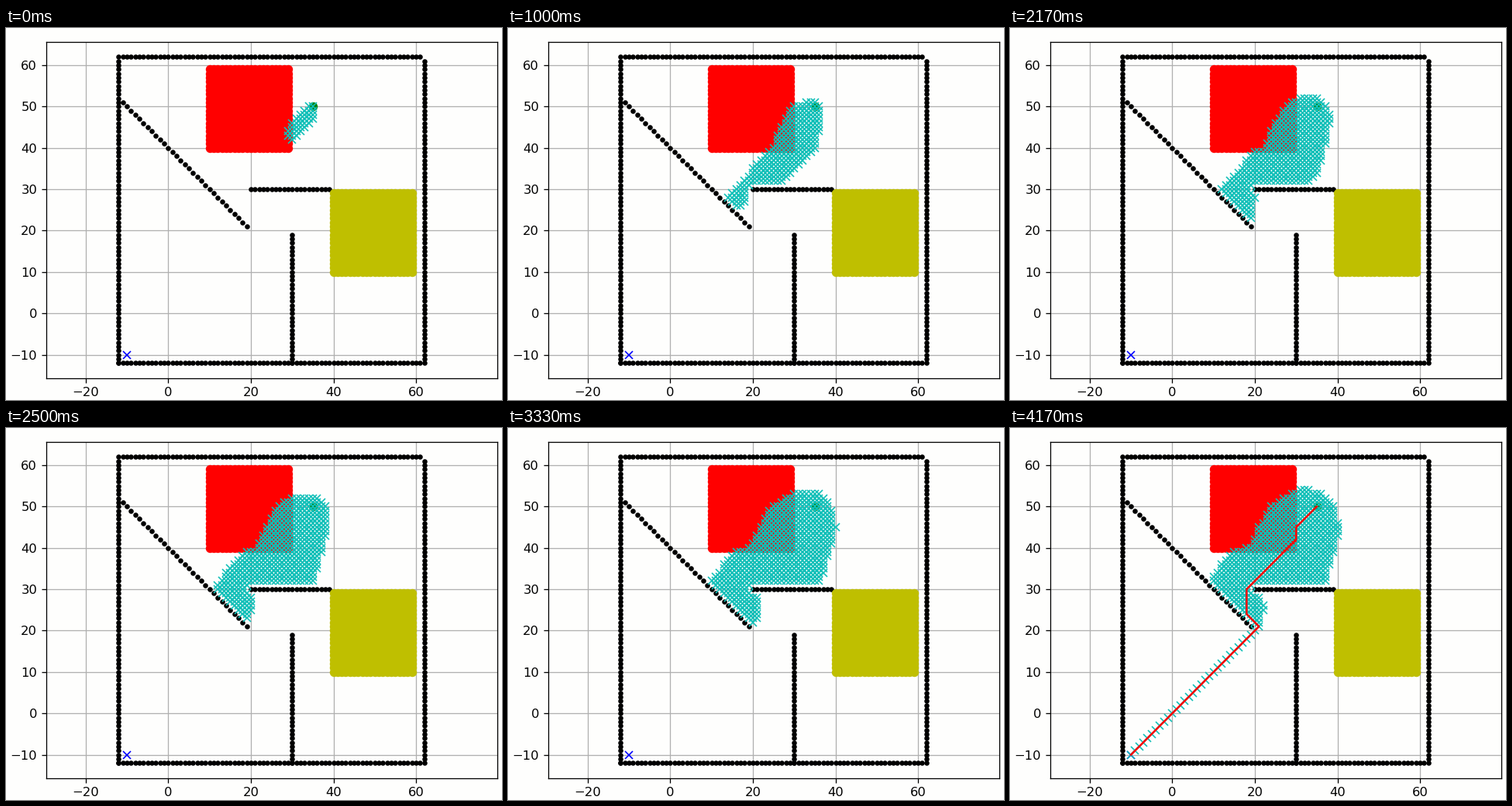
A matplotlib script for the animation above (4260 ms loop, 640x480 px).

```python
import math

import matplotlib.pyplot as plt
import numpy as np
from matplotlib.animation import FuncAnimation

W, H, DPI = 640, 480, 100
LOOP, TICK = 4260, 30           # ms
STEP, LAST = 250 / 3, 50        # the picture changes every STEP ms
S = 1.175                       # scale of lines, markers and text
PAPER, GRID, TEAL = "#fefefd", "#b0b0b0", "#10bfb8"

START, GOAL = (35, 50), (-10, -10)
RED = (10, 30, 40, 60)          # x0, x1, y0, y1 of the costly areas
YELLOW = (40, 60, 10, 30)
RED_COST, YELLOW_COST = 0.3, 1.0


def make_walls():
    side = range(-12, 62)
    walls = [(i, -12) for i in side] + [(62, i) for i in side]
    walls += [(i, 62) for i in side] + [(-12, i) for i in side]
    walls += [(i, 40 - i) for i in range(-11, 20)]
    walls += [(i, 30) for i in range(20, 40)]
    walls += [(30, i) for i in range(-12, 20)]
    return walls


def inside(p, area):
    return area[0] <= p[0] < area[1] and area[2] <= p[1] < area[3]


def search(walls):
    """A* on the unit grid: nodes in visiting order, and the final path."""
    blocked = {(x + dx, y + dy) for x, y in walls
               for dx, dy in ((0, 0), (1, 0), (-1, 0), (0, 1), (0, -1))}
    moves = [(1, 0), (0, 1), (-1, 0), (0, -1),
             (-1, -1), (-1, 1), (1, -1), (1, 1)]
    todo, done, order = {START: (0.0, None)}, {}, []

    def total(p):
        return todo[p][0] + math.hypot(p[0] - GOAL[0], p[1] - GOAL[1])

    while True:
        cur = min(todo, key=total)
        order.append(cur)
        done[cur] = todo.pop(cur)
        if cur == GOAL:
            break
        for dx, dy in moves:
            p = cur[0] + dx, cur[1] + dy
            if p in blocked or p in done:
                continue
            rate = 1 + RED_COST * inside(p, RED) + YELLOW_COST * inside(p, YELLOW)
            cost = done[cur][0] + rate * math.hypot(dx, dy)
            if p not in todo or todo[p][0] > cost:
                todo[p] = cost, cur

    path, p = [], GOAL
    while p is not None:
        path.append(p)
        p = done[p][1]
    return np.array(order), np.array(path)


plt.rcParams.update({
    "font.family": "DejaVu Sans", "font.size": 10 * S,
    "axes.linewidth": 0.8 * S, "grid.linewidth": 0.8 * S,
    "lines.linewidth": 1.5 * S, "lines.markersize": 6 * S,
    "lines.markeredgewidth": S,
})
for k in ("xtick", "ytick"):
    plt.rcParams.update({k + ".major.size": 3.5 * S, k + ".major.pad": 3.5 * S,
                         k + ".major.width": 0.8 * S})

fig = plt.figure(figsize=(W / DPI, H / DPI), dpi=DPI, facecolor=PAPER)
left, right, top, bottom = 51.6, 633.6, 17.5, 452
ax = fig.add_axes([left / W, 1 - bottom / H, (right - left) / W, (bottom - top) / H],
                  facecolor=PAPER)
ax.set_xlim(-29.62, 79.62)
ax.set_ylim(-15.7, 65.7)
ax.set_xticks(range(-20, 61, 20))
ax.set_yticks(range(-10, 61, 10))
ax.grid(True, color=GRID)


def dots(points, style, **kw):
    x, y = np.transpose(points)
    return ax.plot(x, y, style, **kw)[0]


def block(area, style):
    x0, x1, y0, y1 = area
    dots([(x, y) for x in range(x0, x1) for y in range(y0, y1)], style)


walls = make_walls()
order, path = search(walls)
dots(walls, ".k")
dots([START], "og")
dots([GOAL], "xb")
block(YELLOW, "oy")
block(RED, "or")
seen, = ax.plot([], [], "x", color=TEAL)
route, = ax.plot([], [], "-r")


def visited(step):
    """Nodes shown at a step, refreshed ten at a time."""
    if step >= LAST - 1:
        return len(order)
    n = np.interp(step, [0, 12, 19, 26, 40, LAST - 1],
                  [31, 211, 282, 358, len(order) - 60, len(order)])
    return 1 + 10 * int(n // 10)


def draw(i):
    step = min(LAST, int((i * TICK + 25) / STEP))
    seen.set_data(*order[:visited(step)].T)
    route.set_data(*(path if step == LAST else path[:0]).T)
    return seen, route


def reset():
    return draw(0)


anim = FuncAnimation(fig, draw, frames=LOOP // TICK, init_func=reset,
                     interval=TICK, repeat=True, repeat_delay=0)
plt.show()
```
